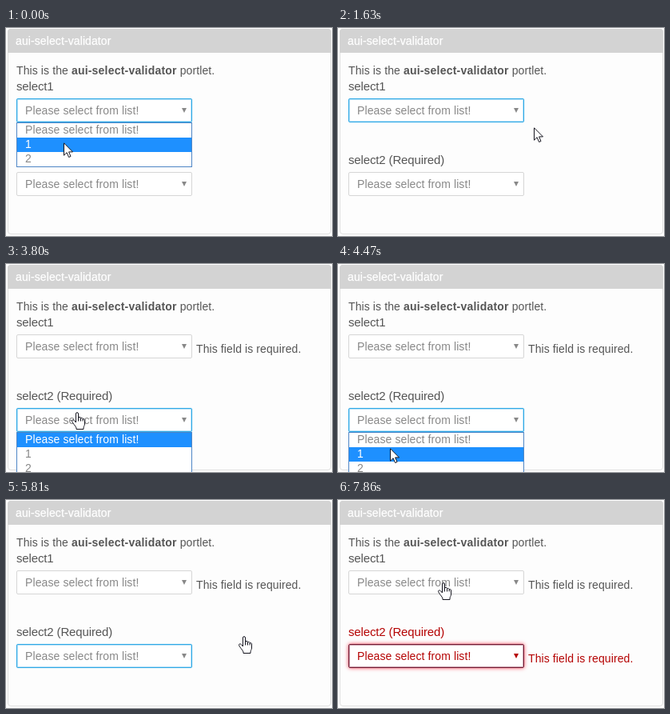
An HTML page for the animation above (8000 ms loop, 408 px wide and 260 px high).

```html
<!DOCTYPE html>
<html lang="en">
<head>
<meta charset="utf-8">
<title>aui-select-validator</title>
<style>
  html, body { margin: 0; width: 100%; height: 100%; overflow: hidden; background: #fff; }
  body { position: relative; font: 14px/20px "Liberation Sans", Arial, sans-serif; letter-spacing: .1px; color: #555; }
  body * { box-sizing: border-box; }
  .at { position: absolute; white-space: nowrap; }

  .portlet { left: 2px; top: 1px; width: 405px; height: 257px; border: 1px solid #dedede; border-radius: 4px;
    background: #fdfdfd; }
  .title { left: 2px; top: 1px; width: 405px; height: 30px; padding: 5px 10px; border-radius: 4px 4px 0 0;
    background: #d3d3d3; color: #fff; -webkit-text-stroke: .25px #fff; }
  .intro { left: 13px; top: 43px; }
  .intro b { letter-spacing: .21px; }
  .label { left: 13px; font-size: 15px; letter-spacing: -.14px; }
  .note { left: 238px; }

  .select { left: 13px; width: 220px; height: 30px; padding: 4px 10px; border: 1px solid #d6d6d6;
    border-radius: 2px; background: #fff; color: #888; }
  .select::after { content: ""; position: absolute; right: 6px; top: 11px; width: 6px; height: 6px;
    background: currentColor; clip-path: polygon(0 0, 100% 0, 50% 100%); }

  .list { left: 13px; width: 220px; height: 56px; border: 1px solid #4f86c6; background: #fff; color: #888; }
  .list div { height: 18px; padding-left: 10px; line-height: 16px; }

  .cursor { left: 0; top: 0; }
  .cursor svg { position: absolute; left: 0; top: 0; overflow: visible; fill: #fff; stroke: #14141e; stroke-linejoin: round; }

  .anim { animation: 8s step-end infinite; }

  /* first field */
  .s1 { animation-name: blur; }
  .list1 { animation-name: list1; }
  .list1 .a { animation-name: top1; }
  .list1 .b { animation-name: one1; }
  .note1 { animation-name: note1; }
  @keyframes blur {
    0% { border-color: #2fa9e6; box-shadow: inset 0 0 0 1px #b9e2f7, 0 0 1px #7fcbf2; }
    23.5% { border-color: #8cbdd6; box-shadow: 0 0 1px #b5dcf0; }
    25%, 100% { border-color: #d6d6d6; box-shadow: none; }
  }
  @keyframes list1 { 0% { visibility: visible; } 12%, 100% { visibility: hidden; } }
  @keyframes top1 {
    0% { background: #fff; color: #888; }
    5.125%, 100% { background: #1e90ff; color: #fff; }
  }
  @keyframes one1 {
    0% { background: #1e90ff; color: #fff; }
    5.125%, 100% { background: #fff; color: #888; }
  }
  @keyframes note1 { 0% { visibility: hidden; } 23.5%, 100% { visibility: visible; } }

  /* second field */
  .s2 { animation-name: error; }
  .label2 { animation-name: label2; }
  .list2 { animation-name: list2; }
  .list2 .a { animation-name: top2; }
  .list2 .b { animation-name: one2; }
  .note2 { color: #b50303; animation-name: note2; }
  @keyframes error {
    0% { border-color: #d6d6d6; box-shadow: none; color: #888; }
    47.5% { border-color: #2fa9e6; box-shadow: inset 0 0 0 1px #b9e2f7, 0 0 1px #7fcbf2; color: #888; }
    77.625% { border-color: #6b3a55; box-shadow: 0 0 2px #e58a92; color: #b50303; }
    79.5%, 100% { border-color: #741c34; box-shadow: inset 0 0 0 1px #cda3b0, 0 0 5px #f8465a; color: #b50303; }
  }
  @keyframes label2 { 0% { color: #555; } 77.625%, 100% { color: #b50303; } }
  @keyframes list2 {
    0% { visibility: hidden; }
    47.5% { visibility: visible; }
    66.25%, 100% { visibility: hidden; }
  }
  @keyframes top2 {
    0% { background: #1e90ff; color: #fff; }
    55.875% { background: #fff; color: #888; }
    59.375%, 100% { background: #1e90ff; color: #fff; }
  }
  @keyframes one2 {
    0% { background: #fff; color: #888; }
    55.875% { background: #1e90ff; color: #fff; }
    59.375%, 100% { background: #fff; color: #888; }
  }
  @keyframes note2 { 0% { visibility: hidden; } 77.625%, 100% { visibility: visible; } }

  /* pointer */
  .cursor { animation-name: move; }
  .arrow { animation-name: arrow; }
  .hand { animation-name: hand; }
  @keyframes move {
    0% { transform: translate(72px, 143px); }
    5.125% { transform: translate(73px, 135px); }
    6.625% { transform: translate(73px, 130px); }
    8.5% { transform: translate(73px, 127px); }
    17% { transform: translate(93px, 116px); }
    18.875% { transform: translate(168px, 112px); }
    20.375% { transform: translate(245px, 124px); }
    21.875% { transform: translate(264px, 133px); }
    23.5% { transform: translate(269px, 135px); }
    25% { transform: translate(270px, 136px); }
    35.75% { transform: translate(239px, 140px); }
    37.25% { transform: translate(172px, 156px); }
    38.75% { transform: translate(113px, 172px); }
    40.625% { transform: translate(87px, 183px); }
    42.5% { transform: translate(82px, 185px); }
    52.875% { transform: translate(79px, 196px); }
    54.375% { transform: translate(71px, 219px); }
    55.875% { transform: translate(65px, 230px); }
    59.375% { transform: translate(74px, 218px); }
    67.75% { transform: translate(112px, 204px); }
    69.25% { transform: translate(196px, 184px); }
    70.75% { transform: translate(257px, 169px); }
    72.625% { transform: translate(291px, 170px); }
    90% { transform: translate(256px, 170px); }
    91.875% { transform: translate(202px, 151px); }
    93.375% { transform: translate(157px, 134px); }
    95.25% { transform: translate(138px, 115px); }
    96.75% { transform: translate(129px, 107px); }
    98.25%, 100% { transform: translate(125px, 103px); }
  }
  @keyframes arrow {
    0%, 20.375%, 54.375%, 91.875% { opacity: 1; }
    17%, 38.75%, 67.75%, 95.25%, 100% { opacity: 0; }
  }
  @keyframes hand {
    0%, 20.375%, 54.375%, 91.875% { opacity: 0; }
    17%, 38.75%, 67.75%, 95.25%, 100% { opacity: 1; }
  }
</style>
</head>
<body>
  <div class="at portlet"></div>
  <div class="at title">aui-select-validator</div>
  <div class="at intro">This is the <b>aui-select-validator</b> portlet.</div>

  <div class="at label" style="top:63px">select1</div>
  <div class="at select anim s1" style="top:88px">Please select from list!</div>
  <div class="at note anim note1" style="top:96px">This field is required.</div>

  <div class="at label anim label2" style="top:155px">select2 (Required)</div>
  <div class="at select anim s2" style="top:180px">Please select from list!</div>
  <div class="at note anim note2" style="top:188px">This field is required.</div>

  <div class="at list anim list1" style="top:118px">
    <div class="anim a">Please select from list!</div>
    <div class="anim b">1</div>
    <div>2</div>
  </div>
  <div class="at list anim list2" style="top:210px">
    <div class="anim a">Please select from list!</div>
    <div class="anim b">1</div>
    <div>2</div>
  </div>

  <div class="at cursor anim">
    <svg class="anim arrow" width="12" height="19">
      <path d="M.5.8v15.4l3.6-3.5 2.5 5.8 2.4-1-2.4-5.6h4.9z"/>
    </svg>
    <svg class="anim hand" width="17" height="22">
      <path d="M5.5 13V2C5.5.2 8.5.2 8.5 2v5.5c0-1.6 3-1.6 3 0v1c0-1.6 2.7-1.4 2.7.3v.7c0-1.4 2.3-1.2 2.3.4V15c0 2-1.5 3-1.5 5v1.5H6V20c0-1.5-5.5-7-5.5-8.7 0-1.6 1.8-1.9 3-.6z"/>
      <path d="M8.5 7v4.5M11.5 8v3.5M14.2 9v2.5" fill="none"/>
    </svg>
  </div>
</body>
</html>
```
